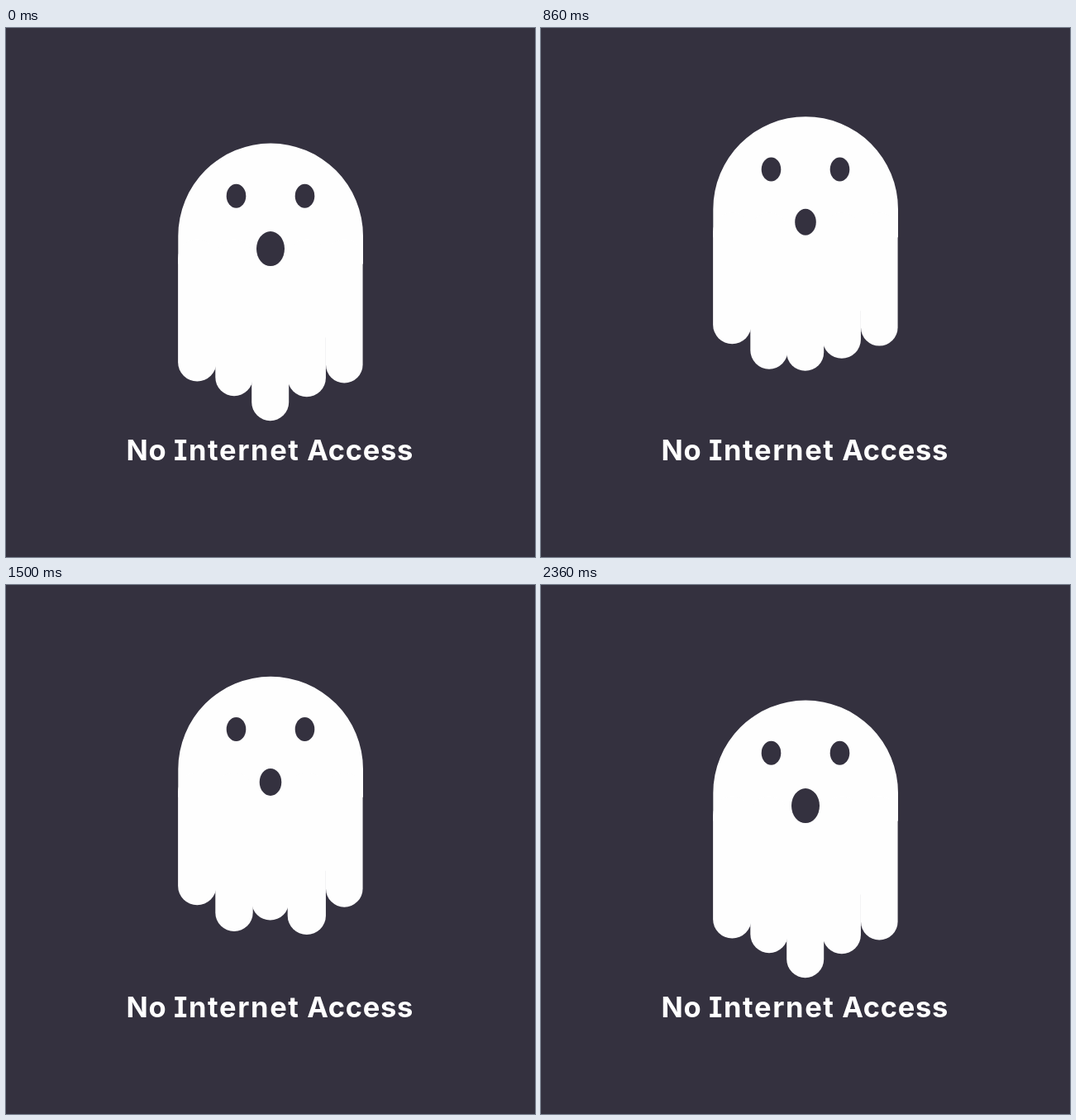
An HTML page that plays this animation: 640x640 px, repeating every 2.43 s.

```html
<!DOCTYPE html>
<html lang="en">
<head>
<meta charset="utf-8">
<title>No Internet Access</title>
<style>
  html, body { margin: 0; width: 100%; height: 100%; overflow: hidden; background: #34313f; }
  svg { display: block; width: 100vw; height: 100vh; }
  text {
    font: 700 34.5px Inter, "Noto Sans", sans-serif;
    font-feature-settings: "cv08";
    letter-spacing: 0.7px;
    fill: #fff;
  }
  .wide { letter-spacing: 1.6px; }
  .white { fill: #fefefe; }
  .dark { fill: #34313f; }
</style>
</head>
<body>
<svg viewBox="0 0 640 640">
  <g id="ghost">
    <path class="white" d="M208.3 112a111.85 112 0 0 1 223.7 0V146H208.3z"/>
    <path class="white" d="M215 140H425V235H215z"/>
    <g id="legs" class="white"></g>
    <g class="dark">
      <ellipse class="eye" cx="278.5" cy="63.8" rx="11.8" ry="14.5"/>
      <ellipse class="eye" cx="361.5" cy="63.8" rx="11.8" ry="14.5"/>
      <ellipse id="mouth" cx="320" cy="127.6" rx="17" ry="21"/>
    </g>
  </g>
  <text y="523"><tspan x="145.4">No</tspan><tspan class="wide" x="203">Internet</tspan><tspan x="364.2">Access</tspan></text>
</svg>
<script>
const LOOP = 2430, STEPS = 34;
const KNOTS = [0, 4, 8, 16, 17, 21, 25, 33];
const LEG_TOP = 116;

// How far the ghost has risen, 0 to 1
const rise = [0, 0.222, 0.545, 1, 1, 0.745, 0.435, 0];

// Leg length below the top of the head: constant plus share of rise, or a track
const legs = [
  { x: 208.1, w: 46.4, len: p => 288 - 15.5 * p },
  { x: 253.3, w: 45.4, track: [305.7, 304.2, 305.3, 305.7, 306, 308.2, 311.2, 305.7] },
  { x: 297.2, w: 45, track: [335.7, 326.7, 314.3, 301.7, 299.4, 294.7, 304.7, 335.7] },
  { x: 340.7, w: 46.25, track: [306.7, 300.5, 292, 299.7, 302, 312.2, 311.2, 306.7] },
  { x: 387, w: 44.6, len: p => 290 - 15 * p }
];

const $ = id => document.getElementById(id);
const eyes = document.querySelectorAll(".eye");

for (const leg of legs) {
  leg.el = document.createElementNS("http://www.w3.org/2000/svg", "rect");
  leg.el.setAttribute("x", leg.x);
  leg.el.setAttribute("y", LEG_TOP);
  leg.el.setAttribute("width", leg.w);
  leg.el.setAttribute("rx", leg.w / 2);
  $("legs").append(leg.el);
}

// Periodic smooth curve through the values at KNOTS
function curve(values, s) {
  const n = KNOTS.length;
  const time = i => KNOTS[(i + n) % n] + STEPS * Math.floor(i / n);
  const value = i => values[(i + n) % n];
  const gap = i => time(i + 1) - time(i);
  const rate = i => (value(i + 1) - value(i)) / gap(i);
  const slope = i => (gap(i) * rate(i - 1) + gap(i - 1) * rate(i)) / (gap(i) + gap(i - 1));
  let i = n - 1;
  while (KNOTS[i] > s) i--;
  const h = gap(i), u = (s - time(i)) / h, v = 1 - u;
  return v * v * (1 + 2 * u) * value(i) + u * u * (1 + 2 * v) * value(i + 1)
    + h * u * v * (v * slope(i) - u * slope(i + 1));
}

function blink(s) {
  const u = Math.max(0, 1 - Math.abs(s - 16.35) / 2.1);
  return 1 - 0.9 * u * u * (3 - 2 * u);
}

function draw(s) {
  const p = curve(rise, s);
  $("ghost").setAttribute("transform", `translate(0 ${139.5 - 38.5 * p})`);
  for (const leg of legs) {
    const len = leg.track ? curve(leg.track, s) : leg.len(p);
    leg.el.setAttribute("height", len - LEG_TOP);
  }
  $("mouth").setAttribute("rx", 17 - 5 * p);
  $("mouth").setAttribute("ry", 21 - 6 * p);
  for (const eye of eyes) eye.setAttribute("ry", 14.5 * blink(s));
}

const start = performance.now();
function tick(now) {
  const t = Math.max(0, now - start) + 12;
  draw(Math.floor((t % LOOP) / LOOP * STEPS));
  requestAnimationFrame(tick);
}
draw(0);
requestAnimationFrame(tick);
</script>
</body>
</html>
```
